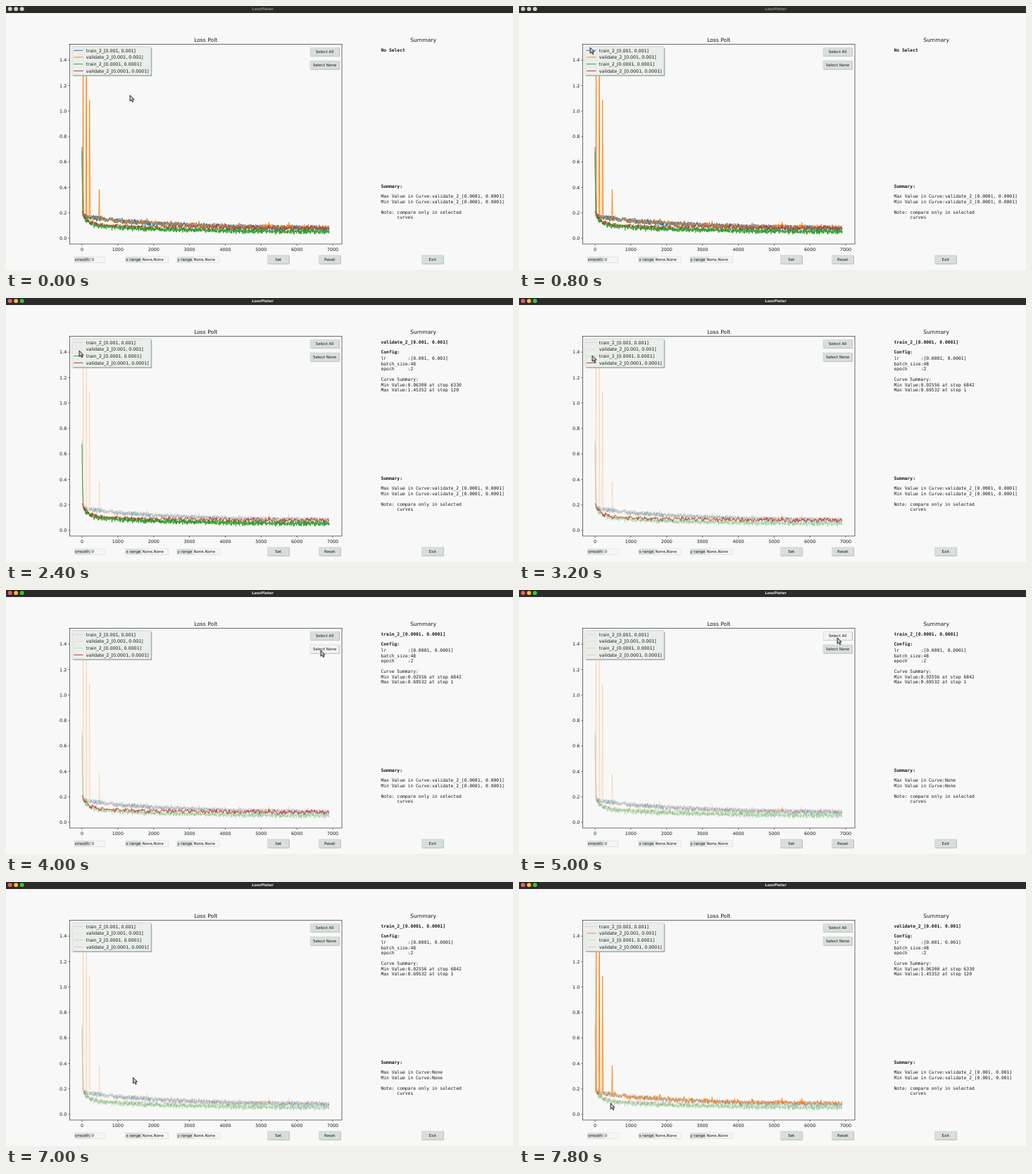
Write an HTML page that moves like this. It is 720 px wide and 376 px high and loops after 8000 ms.

```html
<!DOCTYPE html>
<html lang="en">
<head>
<meta charset="utf-8">
<title>LossPloter</title>
<style>
  html, body { margin: 0; width: 100%; height: 100%; overflow: hidden; background: #f8f8f8; }
  svg { display: block; width: 720px; height: 376px; }
  text { font: 6.34px "DejaVu Sans", sans-serif; fill: #141a16; white-space: pre; text-rendering: geometricPrecision; }
  .mono { font-family: "DejaVu Sans Mono", monospace; }
  .bold { font-weight: bold; }
  .title { font-size: 7.6px; }
  .small { font-size: 5.5px; }
  .mid { text-anchor: middle; }
  .end { text-anchor: end; }
  .bar { font-size: 5.2px; font-weight: bold; }
  .curve { fill: none; stroke-width: .95; stroke-linejoin: round; }
</style>
</head>
<body>
<svg id="stage" viewBox="0 0 720 376"></svg>
<script>
const stage = document.getElementById('stage');
const LOOP = 8000, STEP = 200, FADED = 0.22;

function add(tag, attrs, content = '') {
  const el = document.createElementNS(stage.namespaceURI, tag);
  for (const key in attrs) el.setAttribute(key, attrs[key]);
  el.textContent = content;
  return stage.appendChild(el);
}
const text = (x, y, content, cls = '') => add('text', { x, y, class: cls }, content);
const rect = (x, y, width, height, fill, more = {}) => add('rect', { x, y, width, height, fill, ...more });
const path = (d, stroke, more = {}) => add('path', { d, stroke, fill: 'none', ...more });

// Title bar
rect(0, 0, 720, 10, '#2b2b2b');
const lights = ['#f25f57', '#f5bd30', '#35c648'].map((color, i) =>
  ({ color, el: add('circle', { cx: 5.7 + i * 8.5, cy: 4.2, r: 2.9 }) }));
const barTitle = text(364.5, 6.3, 'LossPloter', 'bar mid');

// Axes
const px = step => 108 + step * 0.05086;
const py = value => 331 - value * 181.4;
text(283.7, 50.6, 'Loss Polt', 'title mid');
text(592.6, 50.6, 'Summary', 'title mid');
for (let s = 0; s <= 7000; s += 1000) {
  path(`M${px(s)} 339v2.3`, '#222', { 'stroke-width': .6 });
  text(px(s), 348.6, s, 'mid');
}
for (let i = 0; i < 8; i++) {
  const y = py(i / 5);
  path(`M90.5 ${y}h-2.3`, '#222', { 'stroke-width': .6 });
  text(86.2, y + 2.3, (i / 5).toFixed(1), 'end');
}

// Loss curves
function random(seed) {
  return () => (seed = (seed * 16807) % 2147483647) / 2147483647;
}
const decay = (s, size, span) => size * Math.exp(-s / span);
const spikes = { 30: 1.43, 120: 1.45352, 210: 1.09, 480: 0.37 };
const series = [
  { name: 'train_2_[0.001, 0.001]', color: '#1f77b4', every: 5, noise: .02,
    mean: s => .075 + decay(s, .1, 2400) + decay(s, .52, 12) },
  { name: 'validate_2_[0.001, 0.001]', color: '#ff7f0e', every: 15, noise: .018,
    mean: (s, r) => spikes[s] || .08 + decay(s, .09, 2200) + r ** 8 * (.025 + decay(s, .06, 900)) },
  { name: 'train_2_[0.0001, 0.0001]', color: '#2ca02c', every: 5, noise: .021,
    mean: s => .05 + decay(s, .055, 2500) + decay(s, .1, 150) + decay(s, .49, 12) },
  { name: 'validate_2_[0.0001, 0.0001]', color: '#d62728', every: 22, noise: .019,
    mean: s => .081 + decay(s, .035, 1500) + decay(s, .08, 150) }
];
series.forEach((line, i) => {
  const rand = random(7919 * (i + 3));
  let d = '';
  for (let s = 0; s <= 6900; s += line.every) {
    const value = line.mean(s, rand()) + (rand() + rand() - 1) * line.noise * 1.3;
    d += `${d ? 'L' : 'M'}${px(s).toFixed(2)} ${py(value).toFixed(2)}`;
  }
  line.curve = path(d, line.color, { class: 'curve' });
});
rect(90.6, 54.5, 386.4, 284.5, 'none', { stroke: '#222', 'stroke-width': .65 });

// Legend
rect(95, 59.3, 112.3, 40.7, '#a0aaa3', { rx: 1.5 });
rect(93.6, 57.9, 112.3, 40.7, '#eaeeeb', { rx: 1.5, stroke: '#c4cac6', 'stroke-width': .6 });
series.forEach((line, i) => {
  const y = 63.3 + i * 9.7;
  line.key = path(`M96 ${y}h13.5`, line.color, { 'stroke-width': .95 });
  text(113.8, y + 2.3, line.name);
});

// Buttons and entries
function button(x, y, width, label) {
  rect(x + .6, y + .6, width, 12, '#9aa39d');
  const face = rect(x, y, width, 12, '#d8deda', { stroke: '#c3cac5', 'stroke-width': .5 });
  text(x + width / 2, y + 7.9, label, 'small mid');
  return { x, y, width, face };
}
const buttons = [
  button(432, 59.4, 41, 'Select All'), button(432, 78, 41, 'Select None'),
  button(371.5, 355, 30.5, 'Set'), button(444.5, 355, 30.5, 'Reset'), button(590.5, 355, 30.5, 'Exit')
];
function entry(x, split, end, label, value) {
  rect(x, 357, split - x, 8.6, '#d8deda');
  rect(split, 357, end - split, 8.6, '#f5f5f5', { stroke: '#cdd2ce', 'stroke-width': .5 });
  text(x + .8, 363, label, 'small');
  text(split + .9, 363, value, 'small');
}
entry(97, 120.6, 141, 'smooth:', '0');
entry(169.5, 192.6, 230.5, 'x range', 'None,None');
entry(242.5, 265.5, 303.5, 'y range', 'None,None');

// Summary panel
const mono = (y, content = '', bold = '') => text(532.5, y, content, 'mono ' + bold);
const heading = mono(65.2, '', 'bold');
const details = [79.3, 88.2, 95.7, 103, 118.2, 125.8, 133.2].map((y, i) => mono(y, '', i ? '' : 'bold'));
mono(258.8, 'Summary:', 'bold');
const maxLine = mono(273.2), minLine = mono(280.8);
mono(295.7, 'Note: compare only in selected');
mono(303, '      curves');

const extremes = [
  ['0.05630 at step 6771', '0.70144 at step 1'],
  ['0.06300 at step 6330', '1.45352 at step 120'],
  ['0.02556 at step 6842', '0.69532 at step 1']
];
function describe(index) {
  if (index < 0) return ['No Select'];
  const name = series[index].name, [min, max] = extremes[index];
  return [name, 'Config:', 'lr        :' + name.slice(name.indexOf('[')), 'batch_size:48', 'epoch     :2',
    'Curve Summary:', 'Min Value:' + min, 'Max Value:' + max];
}

const cursor = path('M0 0V8.4L2 6.6 3.5 9.8 4.9 9.1 3.5 6.1H6.1Z', '#1c1c1c',
  { fill: '#c4c8c5', 'stroke-width': .9, 'stroke-linejoin': 'round' });

// [ms, x, y] of the pointer, eased between stops
const stops = [
  [0, 176, 127], [800, 101, 59], [1600, 101, 60], [2000, 104, 75], [2400, 104, 75], [2800, 104, 82],
  [3200, 104, 82], [3800, 447, 86], [4400, 447, 86], [4800, 452, 68], [5400, 452, 68], [5800, 453, 81],
  [6400, 453, 81], [7200, 130, 315], [8000, 130, 315]
];
// [ms, visible curves, curve described, curve named as extreme]
const states = [
  [0, '1111', -1, 3], [1400, '0111', 0, 3], [2200, '0011', 1, 3], [3000, '0001', 2, 3],
  [4200, '0000', 2, -1], [5200, '1111', 2, 3], [6200, '0000', 2, -1], [7400, '0100', 1, 1]
];
const FOCUS = 1200;

function pointerAt(t) {
  const i = Math.max(1, stops.findIndex(stop => stop[0] >= t));
  const [t0, x0, y0] = stops[i - 1], [t1, x1, y1] = stops[i];
  const u = (t - t0) / (t1 - t0), k = u * u * (3 - 2 * u);
  return [x0 + (x1 - x0) * k, y0 + (y1 - y0) * k];
}

function draw(t) {
  const active = t >= FOCUS;
  lights.forEach(({ el, color }) => el.setAttribute('fill', active ? color : '#d0d4d1'));
  barTitle.style.fill = active ? '#e6e6e6' : '#8c8c8c';

  const [, shown, subject, extreme] = states.filter(state => state[0] <= t).pop();
  series.forEach((line, i) => {
    const opacity = shown[i] === '1' ? 1 : FADED;
    line.curve.setAttribute('opacity', opacity);
    line.key.setAttribute('opacity', opacity);
  });
  const [head, ...rest] = describe(subject);
  heading.textContent = head;
  details.forEach((el, i) => el.textContent = rest[i] || '');
  const name = extreme < 0 ? 'None' : series[extreme].name;
  maxLine.textContent = 'Max Value in Curve:' + name;
  minLine.textContent = 'Min Value in Curve:' + name;

  const [x, y] = pointerAt(t);
  cursor.setAttribute('transform', `translate(${x} ${y})`);
  buttons.forEach(b => {
    const hover = x >= b.x && x <= b.x + b.width && y >= b.y && y <= b.y + 12;
    b.face.setAttribute('fill', hover ? '#f2f2f2' : '#d8deda');
  });
}

const start = performance.now();
let last = -1;
function tick() {
  const t = Math.floor(((performance.now() - start) % LOOP) / STEP) * STEP;
  if (t !== last) draw(last = t);
  requestAnimationFrame(tick);
}
tick();
</script>
</body>
</html>
```
